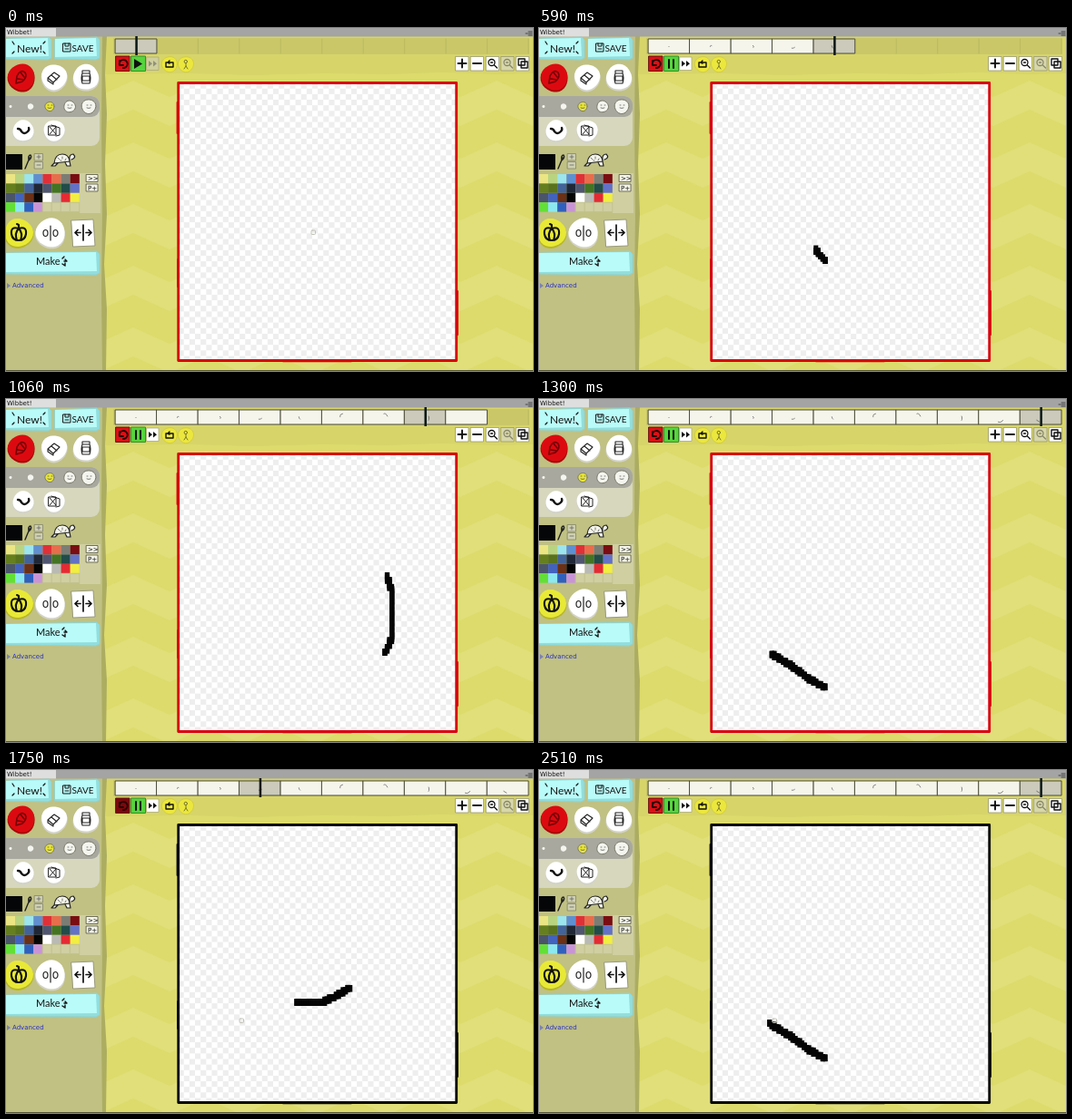
An HTML page with a canvas for the animation above (2.54 s loop, 580x378 px).

```html
<!DOCTYPE html>
<html lang="en">
<head>
<meta charset="utf-8">
<title>Drawing app</title>
<style>
html, body { margin: 0; width: 100%; height: 100%; overflow: hidden; background: #dcdb6c; }
canvas { display: block; }
</style>
</head>
<body>
<canvas id="stage" width="580" height="378"></canvas>
<script>
const g = document.getElementById('stage').getContext('2d');
const LOOP = 2540, START = 46, STEP = 127.5, STOP = 1740;
const CELLS = 10, CELL_W = 45.45, PIXEL = 2.55, CHECK = 6.14;
const HAND = 'Lato, sans-serif', UI = '"DejaVu Sans", sans-serif';

// One clockwise spiral, split into one stroke per timeline cell: x, y, x, y ...
const strokes = [
  [338, 225, 339, 221],
  [339, 221, 343, 207, 355, 200, 368, 203],
  [368, 203, 382, 212, 386, 226, 378, 240],
  [378, 240, 362, 250, 345, 257, 318, 257],
  [316, 257, 304, 245, 290, 215, 289, 207],
  [289, 207, 290, 180, 305, 152, 343, 139],
  [343, 139, 357, 134, 375, 134, 390, 149, 406, 170, 420, 193],
  [419, 194, 425, 213, 425, 262, 417, 281],
  [417, 281, 390, 312, 350, 325, 315, 318],
  [315, 318, 298, 309, 278, 294, 253, 279]
];
const palette = ['#ebe583', '#b9d480', '#9ce5ee', '#608fd0', '#df3038', '#e86d4c', '#7b7d75', '#790d12',
  '#667f1e', '#58721d', '#41639a', '#202838', '#50566f', '#437423', '#214c4a', '#6371c6',
  '#4b556a', '#4262bd', '#6b3015', '#050505', '#ffffff', '#b9bab5', '#e52a33', '#f2ee41',
  '#62e035', '#8ce8f0', '#3060bd', '#c994d7'];

function rect(x, y, w, h, fill, line, width = 1) {
  if (fill) { g.fillStyle = fill; g.fillRect(x, y, w, h); }
  if (line) { g.strokeStyle = line; g.lineWidth = width; g.strokeRect(x, y, w, h); }
}
function path(d, line = '#111', width = 1.5, fill) {
  const p = new Path2D(d);
  if (fill) { g.fillStyle = fill; g.fill(p); }
  if (line) { g.strokeStyle = line; g.lineWidth = width; g.stroke(p); }
}
function at(x, y, draw) {
  g.save();
  g.translate(x, y);
  draw();
  g.restore();
}
function text(s, x, y, size, font, color = '#111') {
  g.font = `${size}px ${font}`;
  g.fillStyle = color;
  g.fillText(s, x, y);
}
function disc(x, y, r, fill, line) {
  g.beginPath();
  for (let a = 0; a < 6.28; a += 0.2) {
    const q = r + r * 0.03 * Math.sin(3 * a + x);
    g.lineTo(x + q * Math.cos(a), y + q * Math.sin(a));
  }
  g.closePath();
  g.fillStyle = fill;
  g.fill();
  if (line) { g.strokeStyle = line; g.lineWidth = 1; g.stroke(); }
}
function blob(x, y, r, fill = '#fff', shade = '#d3d3c8') {
  disc(x, y + 1, r, shade);
  disc(x, y - 0.5, r - 0.5, fill);
}
function slab(x, y, w, h) {
  path(`M${x} ${y + 2}L${x + w - 3} ${y}L${x + w} ${y + 3}L${x + w} ${y + h - 2}L${x + w - 4} ${y + h}L${x} ${y + h - 1}Z`, '#8ed4d2', 1, '#92dedd');
  path(`M${x} ${y + 2}L${x + w - 4} ${y + 1}L${x + w - 3} ${y + h - 4}L${x} ${y + h - 3}Z`, null, 0, '#b9fbf8');
}

function background() {
  rect(0, 0, 580, 378, '#dcdb6b');
  for (let y = -10; y < 420; y += 68) {
    let top = '', bottom = '';
    for (let x = 100; x <= 620; x += 40) {
      const peak = y + (x / 20 % 4 === 3 ? 0 : 18);
      top += `L${x} ${peak}`;
      bottom = `L${x} ${peak + 32}` + bottom;
    }
    path('M' + (top + bottom).slice(1) + 'Z', null, 0, '#e0df79');
  }
  path('M108 9H580V50L540 51L480 49L420 51L350 50L270 52L200 50L108 51Z', null, 0, '#d7d569');
  rect(118, 11, 458, 18, '#c9c768');
  rect(0, 9, 107, 369, '#c0c183');
  path('M106 9H111L109 50L111 95L109 150L111 205L108 260L111 310L110 378H106L105 290L106 200L105 110Z', null, 0, '#acad61');
  rect(0, 0, 580, 9.5, '#a4a4a4');
  rect(0, 0, 55, 9.5, '#dedede');
  text('Wibbet!', 1, 7, 7, UI);
  path('M572 6h2M575 4h4M575 6h4M575 8h4', '#444', 1);
  rect(0, 377, 580, 1, '#56573c');
}

function sidebar() {
  slab(0, 10, 50, 25);
  text('New!', 12, 27, 12, HAND);
  path('M7 15l2 3M7 28l2-2M43 15l-2 2M43 28l-2-2', '#111', 1.2);
  slab(54, 10, 49, 25);
  path('M63 17h8v9h-8ZM65 17v3h4v-3M65 23h4', '#111', 1);
  text('SAVE', 72.5, 26, 10, HAND);

  blob(17, 54.5, 15, '#dc0a10', '#a60808');
  path('M11 61L12 53Q16 45 21 49Q24 54 18 59ZM13 56l6 1M16 49l4 5', '#740006', 1.6);
  blob(53, 54.5, 14.5);
  path('M46 55l7-6l6 4l-7 7ZM46 55v3l6 4v-2M50 52l6 5', '#222', 1.1);
  blob(88, 54.5, 14.5);
  path('M84 47h8v3h-8ZM84 50q-2 5 0 11h8q2-6 0-11M84 53h8v5h-8Z', '#222', 1.1);

  g.fillStyle = '#d6d7bd';
  g.beginPath(); g.roundRect(-8, 75, 111, 55, 9); g.fill();
  g.fillStyle = '#a8a89f';
  g.beginPath(); g.roundRect(-8, 75, 111, 23, 9); g.fill();
  [[5, 1.5], [27, 3.2], [48, 5], [70, 6.3], [91, 7.8]].forEach(([x, r], i) => {
    disc(x, 86.5, r, i === 2 ? '#e9e638' : '#f5f5ef', i > 1 ? '#777766' : null);
    if (i > 1) path(`M${x - 2} 85h1M${x + 2} 85h1M${x - 2} 88q2 1 4 0`, '#444', 0.7);
  });
  blob(19, 113.5, 12);
  path('M13 111q3 0 4 3q3 4 7 0q2-2 1-4', '#111', 2.4);
  blob(53, 113.5, 12);
  path('M47 108h8v10h-8ZM50 107l9 3v8l-4 1M48 109l7 8M55 109l-7 8', '#222', 1);

  rect(0, 139, 18, 17, '#050608');
  path('M21 155L26 143M25 146q-1-6 2-6q2 3-2 6', '#222', 1.4);
  for (const y of [138, 147]) {
    rect(31.5, y + 0.5, 9, 7.5, '#cfcfb2', '#85866a', 0.8);
    path(`M34 ${y + 4}h4` + (y < 140 ? 'm-2-2v4' : ''), '#666', 0.8);
  }
  path('M53 149Q54 139 62 139Q69 139 70 147ZM70 146q-1-7 4-7q4 4-2 6M53 149l-3 3h4l3-3M65 148l2 4h4l-1-5', '#222', 1.2, '#f4f4ea');
  path('M57 143l2 2M62 142v2M66 144l-1 2M60 146h1', '#555', 0.8);

  rect(81, 160, 23, 44, '#cfcfa2');
  for (let i = 0; i < 32; i++)
    rect(i % 8 * 10.1, 161 + (i >> 3) * 10.4, 10.1, 10.4, palette[i] || '#cfcfa2', palette[i] ? null : '#c0c08d', 0.7);
  ['>>', 'P+'].forEach((label, i) => {
    rect(88.5, 161.5 + i * 10.5, 12.5, 8, '#f4f4e8', '#55553e', 0.8);
    text(label, 90, 168 + i * 10.5, 7, UI);
  });

  blob(14, 226, 16, '#e8e936', '#b7b62a');
  path('M14 221Q5 218 6 227Q7 234 14 234Q21 234 22 227Q23 218 14 221ZM14 221Q9 226 12 234M14 221Q19 226 16 234M14 221v-4l-2-1', '#111', 2.1);
  blob(49, 226, 16.5);
  path('M49 218v16M46 226a2.5 3.5 0 1 0-5 0a2.5 3.5 0 1 0 5 0M57 226a2.5 3.5 0 1 0-5 0a2.5 3.5 0 1 0 5 0', '#222', 1.2);
  path('M72 212L96 211L98 240L74 241Z', '#999980', 1, '#fff');
  path('M85 217v17M82 225.5h-6m3-3l-3 3l3 3M88 225.5h6m-3-3l3 3l-3 3', '#111', 1.7);

  slab(0, 246, 103, 26);
  text('Make', 33, 261, 11, HAND);
  path('M62 254l2-2M64 257h3l-2-2M62 260l3 2v-3', '#111', 1.4);
  path('M1 281l4 3l-4 3Z', null, 0, '#7d83b0');
  text('Advanced', 7, 286, 7, UI, '#292fc4');
}

function toolbar(playing, pressed) {
  rect(121, 31, 15, 16.5, pressed ? '#7d080c' : '#dd1015', '#641010');
  path('M125 41a4.5 4.5 0 1 1 4 3M125 36v5h4', '#260303', 1.8);
  rect(138, 31, 15.5, 16.5, '#56d43d', '#398e2c');
  if (playing) path('M143 35v9M148 35v9', '#111', 2);
  else path('M141 34L150 39.5L141 45Z', null, 0, '#111');
  rect(155, 32, 13, 14.5, playing ? '#fff' : '#cfcf9f', '#aaa983', 0.8);
  path('M157 36l4 3.2l-4 3.2ZM162 36l4 3.2l-4 3.2Z', null, 0, playing ? '#111' : '#929178');
  disc(180, 40, 8.5, '#ece73d', '#d2cd42');
  path('M176 38h8v5h-8ZM180 36l-2 2l2 1', '#111', 1.4);
  disc(198, 40, 8.5, '#ece73d', '#d2cd42');
  path('M199.5 37a1.7 1.7 0 1 0-3.4 0a1.7 1.7 0 1 0 3.4 0M198 39v3l2 3M198 42l-2 3', '#75752c', 1);

  [495, 511.5, 528.5, 545, 561.5].forEach((x, i) =>
    rect(x, 31.5, 14, 15.5, i === 3 ? '#d7d7aa' : '#fff', '#9a9974', 0.8));
  path('M502 34.5v9M497.5 39h9M514 39h9', '#111', 1.9);
  for (const [x, color] of [[534.5, '#111'], [551.5, '#88876c']])
    at(x, 38, () => path('M3.5 0a3.5 3.5 0 1 0-7 0a3.5 3.5 0 1 0 7 0M3 3l3 3M-1 0h2', color, 1.3));
  path('M564 34h7v7h-7ZM567 37h7v7h-7Z', '#111', 1.4, '#fff');
}

function paper(color) {
  rect(190, 61, 306, 306, '#fff');
  g.fillStyle = '#eeeeee';
  for (let i = 0; i < 50; i++)
    for (let j = i % 2; j < 50; j += 2) g.fillRect(189.6 + i * CHECK, 60.6 + j * CHECK, CHECK, CHECK);
  rect(189.7, 60.5, 306, 306, null, color, 2.8);
  path('M188.7 82V116M496.8 290V338M196 60H238M360 60H412M305 367.2H380M189.2 255V285', color, 2.2);
}

// Returns the drawn part of a stroke as a list of points one unit apart.
function trace(stroke, part) {
  const points = [];
  for (let i = 2; i < stroke.length; i += 2) {
    const [x0, y0, x1, y1] = stroke.slice(i - 2, i + 2);
    const n = Math.ceil(Math.hypot(x1 - x0, y1 - y0));
    for (let k = 0; k < n; k++) points.push([x0 + (x1 - x0) * k / n, y0 + (y1 - y0) * k / n]);
  }
  return points.slice(0, Math.ceil(points.length * part));
}
function ink(stroke, part) {
  g.fillStyle = '#050505';
  const snap = (v, origin) => origin + Math.round((v - origin) / PIXEL) * PIXEL;
  for (const [x, y] of trace(stroke, part))
    g.fillRect(snap(x - 2.5, 190), snap(y - 3.8, 61), 2 * PIXEL, 3 * PIXEL);
}
function brushCursor(x, y) {
  g.beginPath();
  g.roundRect(x - 2, y - 2, 4.5, 4.5, 1);
  g.strokeStyle = '#c2c2b8';
  g.lineWidth = 1;
  g.stroke();
}

function timeline(tau, current) {
  const count = Math.min(CELLS, Math.floor(tau + 0.1) + 1);
  for (let i = 0; i < CELLS; i++) {
    const x = 120.5 + i * CELL_W;
    if (i >= count) {
      path(`M${x + CELL_W} 12v16`, '#b9b75e', 0.8);
      continue;
    }
    rect(x, 12, CELL_W, 16, i === current ? '#cbcabb' : '#f6f5ec', '#4e4e3c', 1);
    if (i < tau) at(x + CELL_W / 2, 20, () => {
      g.scale(0.05, 0.05);
      g.translate(-343, -213);
      const [x0, y0, ...rest] = strokes[i];
      path(`M${x0} ${y0}L${rest}`, '#555', 14);
    });
  }
  rect(119.6 + (current + 0.5) * CELL_W, 9, 2.5, 21, '#0b1715');
}

function draw(t) {
  const tau = Math.max(0, (t - START) / STEP);
  const current = Math.floor(tau) % CELLS;
  const playing = t >= START;
  background();
  sidebar();
  toolbar(playing, t >= STOP && t < STOP + 90);
  timeline(tau, current);
  paper(t < STOP ? '#d8000f' : '#080808');
  if (playing) ink(strokes[current], tau < CELLS ? Math.min(1, tau % 1 * 1.15) : 1);
  if (!playing) brushCursor(338, 225);
  else if (tau >= CELLS) brushCursor(259, 276);
}

g.lineJoin = g.lineCap = 'round';
const begin = performance.now();
function tick() {
  draw((performance.now() - begin) % LOOP);
  requestAnimationFrame(tick);
}
tick();
</script>
</body>
</html>
```
